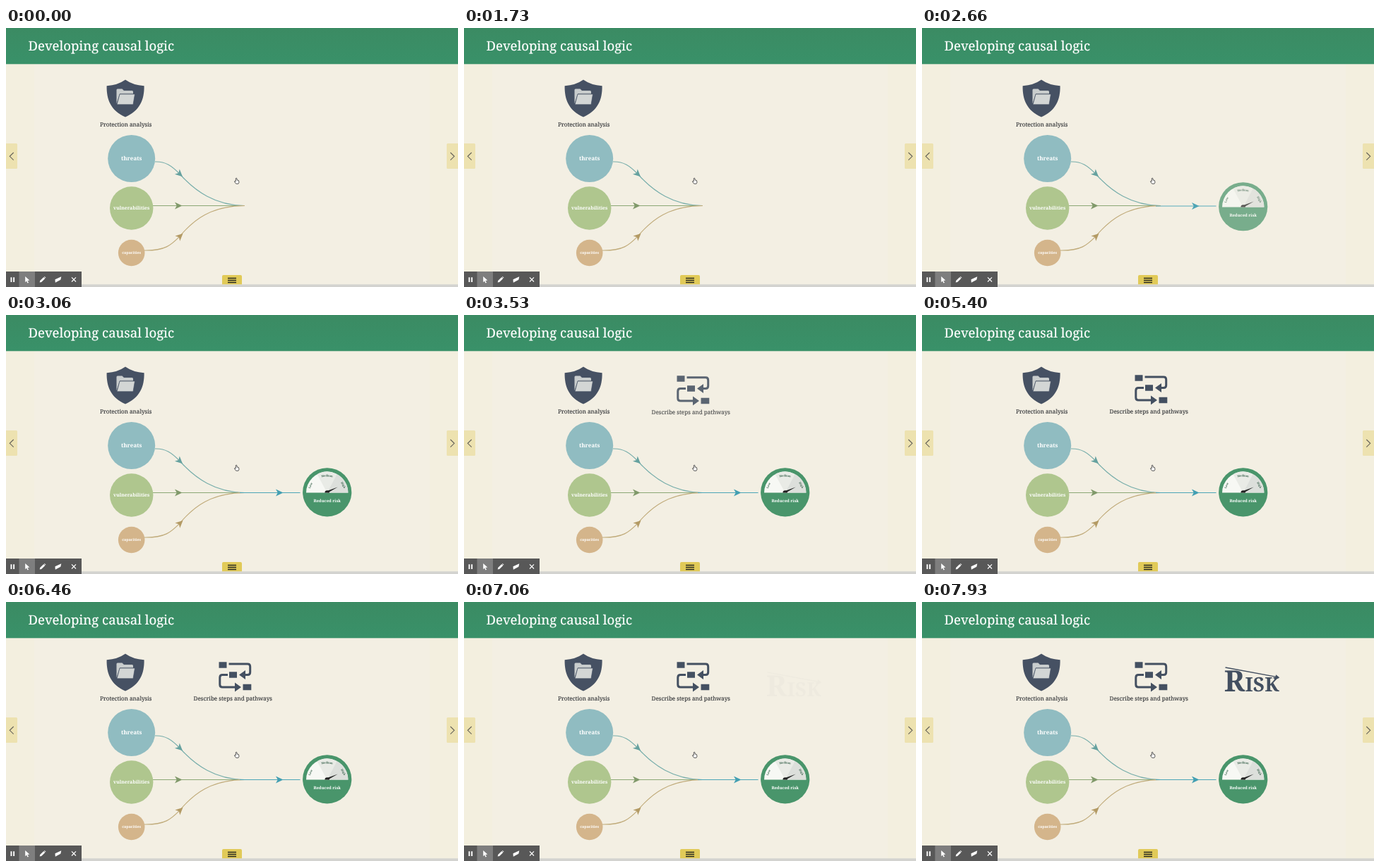
Recreate the animation shown at these times as an HTML page. Size 640 by 368 pixels, loop 8000 ms.

```html
<!DOCTYPE html>
<html lang="en">
<head>
<meta charset="utf-8">
<title>Developing causal logic</title>
<style>
html, body { margin: 0; width: 100%; height: 100%; overflow: hidden; background: #f3efe2; }
svg { display: block; width: 100vw; height: 100vh; }
text { font-family: "Noto Serif", "Liberation Serif", serif; text-rendering: geometricPrecision; }
.title { font-size: 18.55px; fill: #fff; stroke: #fff; stroke-width: .2; }
.caption { font-size: 8.12px; fill: #35373a; stroke: #35373a; stroke-width: .14; text-anchor: middle; }
.bold { font-weight: 700; fill: #fff; text-anchor: middle; }
.dial { font-size: 3.8px; font-weight: 700; fill: #345f49; text-anchor: middle; }
.line { fill: none; stroke-width: 1.15; }
</style>
</head>
<body>
<svg viewBox="0 0 640 368">
  <defs>
    <linearGradient id="bar" x2="0" y2="1">
      <stop stop-color="#3b8b63"/><stop offset="1" stop-color="#399169"/>
    </linearGradient>
    <path id="head" d="M5.5 0L-5 -5L-2.2 0L-5 5Z"/>
    <path id="arc" d="M430 252A24.500 22.500 0 0 1 479 252"/>
  </defs>

  <rect width="640" height="368" fill="#f3efe3"/>
  <path d="M0 51H40V368H0ZM600 51H640V368H600Z" fill="#f3efdf"/>
  <rect width="640" height="51.300" fill="url(#bar)"/>
  <text class="title" x="31.500" y="32">Developing causal logic</text>

  <!-- Protection analysis -->
  <path d="M169 73.500Q158 81.300 142.600 82.300C142.200 102 148.500 117.500 169 126.500C189.500 117.500 196 102 195.600 82.300Q180 81.300 169 73.500Z" fill="#465163"/>
  <g transform="translate(-.5 -.5)">
    <path d="M157 108V88.500Q157 87 158.500 87H165L167.500 89.500H179Q180.500 89.500 180.500 91V94H161.500Z" fill="#c9cdcd"/>
    <path d="M161.500 94.500H183L180.500 109.300H157.500Z" fill="#d3d6d5" stroke="#465163" stroke-width=".7"/>
  </g>
  <text class="caption" x="169.700" y="139.600">Protection analysis</text>

  <!-- Inputs -->
  <g id="inputs"></g>

  <!-- Outcome arrow -->
  <g id="link">
    <path class="line" d="M331 252.500H416.500" stroke="#4ba5b7"/>
    <use href="#head" x="387" y="252.500" fill="#429fb2"/>
  </g>

  <!-- Risk gauge -->
  <g id="gauge">
    <circle cx="454.700" cy="251.800" r="34.600" fill="#49956b"/>
    <path d="M425 252.600A29.700 30 0 0 1 484.400 252.600Z" fill="#f7f8f4"/>
    <path d="M454.700 252.600L440.500 226.200A29.700 30 0 0 1 468.500 226Z" fill="#e9ebe6"/>
    <path d="M454.700 252.600L468.500 226A29.700 30 0 0 1 484.400 252.600Z" fill="#dcdfdb"/>
    <text class="dial"><textPath href="#arc" startOffset="13%">Low</textPath></text>
    <text class="dial"><textPath href="#arc" startOffset="50%">Medium</textPath></text>
    <text class="dial"><textPath href="#arc" startOffset="86%">High</textPath></text>
    <path d="M454 250.300L469.700 244.500L455.800 252.600Z" fill="#222"/>
    <path d="M451.400 252.600A3.300 3.300 0 0 1 458 252.600Z" fill="#222"/>
    <text class="bold" x="454.700" y="265.800" font-size="5.850">Reduced risk</text>
  </g>

  <!-- Steps and pathways -->
  <g id="steps">
    <g fill="#445061" transform="translate(0 -.8)">
      <path d="M301.500 86H312.500V94.500H301.500ZM316 100H327V108.500H316ZM335.500 117.500H347.300V126H335.500Z"/>
      <path d="M330 104.300L339 97.800V110.800ZM333 121.800L324 115.300V128.300Z"/>
      <path d="M315.500 88.700H342Q345.700 88.700 345.700 92.500V100.500Q345.700 104.300 342 104.300H338M314 104.300H306.500Q302.800 104.300 302.800 108V118Q302.800 121.800 306.500 121.800H325" fill="none" stroke="#445061" stroke-width="3"/>
    </g>
    <text class="caption" x="321.300" y="139.600">Describe steps and pathways</text>
  </g>

  <!-- Risk wordmark -->
  <g id="risk" fill="#434f60">
    <text x="427.800" y="127.200" font-size="41.500" font-weight="700">R</text>
    <text x="457.500" y="127.200" font-size="28" font-weight="700">ISK</text>
    <path d="M429.500 93L503 106.600" stroke="#434f60" stroke-width="1.400"/>
    <path d="M506.500 107.400L499.800 108.800L501.200 103.200Z"/>
  </g>

  <!-- Navigation -->
  <path d="M0 164H14.500Q16 164 16 165.500V198.500Q16 200 14.500 200H0ZM640 164H625.500Q624 164 624 165.500V198.500Q624 200 625.500 200H640Z" fill="#ede2b0"/>
  <path d="M10.700 177L5.300 182.300L10.700 187.600M629.300 177L634.700 182.300L629.300 187.600" fill="none" stroke="#67645b" stroke-width="1.150"/>
  <rect y="364.300" width="640" height="4" fill="#d3d3d0"/>
  <path d="M306 364.300V353Q306 351 308 351H332Q334 351 334 353V364.300Z" fill="#e1ca58"/>
  <path d="M314 355.500H326M314 358.500H326M314 361.500H326" stroke="#292a20" stroke-width="1.400"/>

  <!-- Presenter tools -->
  <rect y="346" width="107" height="22" fill="#585858"/>
  <rect x="18.500" y="346" width="22.500" height="22" fill="#7e7e7e"/>
  <g fill="#fff">
    <path d="M6.500 354.300H8.400V361H6.500ZM10.200 354.300H12.100V361H10.200Z"/>
    <path d="M27.200 353L33.300 358.600L30.400 358.900L32 361.800L30.500 362.500L29.100 359.500L27.200 361.300Z"/>
    <path d="M47.700 361.600L48.200 359L53.300 354L55.300 356L50.200 361.100ZM53.900 353.400L54.500 352.900L56.500 354.800L55.900 355.400Z"/>
    <path d="M69.500 357.200L78.300 353.300L77.300 357.800L69.800 361.800Z"/>
    <path d="M93 354.300L99 360.500M99 354.300L93 360.500" stroke="#fff" stroke-width="1.200"/>
  </g>

  <path d="M325.300 213.700Q326.300 212.700 327 213.800V216L329.300 216.500L330 219.200L329 221.300H325.700L323.300 218Q323.600 216.900 325.300 218Z" fill="#fff" stroke="#333" stroke-width=".8" stroke-linejoin="round"/>
</svg>
<script>
const LOOP = 8000;
const RISE = 7;
const $ = id => document.getElementById(id);

const inputs = [
  { name: "threats", y: 185.5, r: 33.5, size: 8.1, fill: "#90bcc1", line: "#78aeab", tip: "#65a19f",
    path: "M211 190C226 189.500 235 196 246 207.500C268 232 296 252 338 252.500", head: [246, 207.5, 43] },
  { name: "vulnerabilities", y: 256, r: 30.7, size: 6.85, fill: "#afc68e", line: "#8aa774", tip: "#80996a",
    path: "M208 252.500H338", head: [244, 252.5, 0] },
  { name: "capacities", y: 319.5, r: 18.8, size: 5.3, fill: "#d4b58b", line: "#c0ab7a", tip: "#b39a64",
    path: "M196 316C226 316.500 234 308 246 296C266 272 290 253 338 252.500", head: [246.5, 295.7, -43] }
];

$("inputs").innerHTML = inputs.map(({ name, y, r, size, fill, line, tip, path, head: [hx, hy, turn] }) => `
  <path class="line" d="${path}" stroke="${line}"/>
  <use href="#head" fill="${tip}" transform="translate(${hx} ${hy}) rotate(${turn})"/>
  <circle cx="177.7" cy="${y}" r="${r}" fill="${fill}"/>
  <text class="bold" x="177.7" y="${y + size * 0.35}" font-size="${size}">${name}</text>`).join("");

// Start and end of each entrance, in ms
const entrances = { link: [2200, 2700], gauge: [2300, 2800], steps: [3100, 3600], risk: [7050, 7550] };
const parts = Object.entries(entrances).map(([id, span]) => [$(id), ...span]);

// Each part fades in while rising into place
function draw(time) {
  const t = time % LOOP;
  for (const [part, start, end] of parts) {
    const shown = Math.min(1, Math.max(0, (t - start) / (end - start)));
    part.setAttribute("opacity", shown);
    part.setAttribute("transform", `translate(0 ${RISE * (1 - shown)})`);
  }
}

function tick() {
  draw(performance.now());
  requestAnimationFrame(tick);
}
tick();
</script>
</body>
</html>
```
